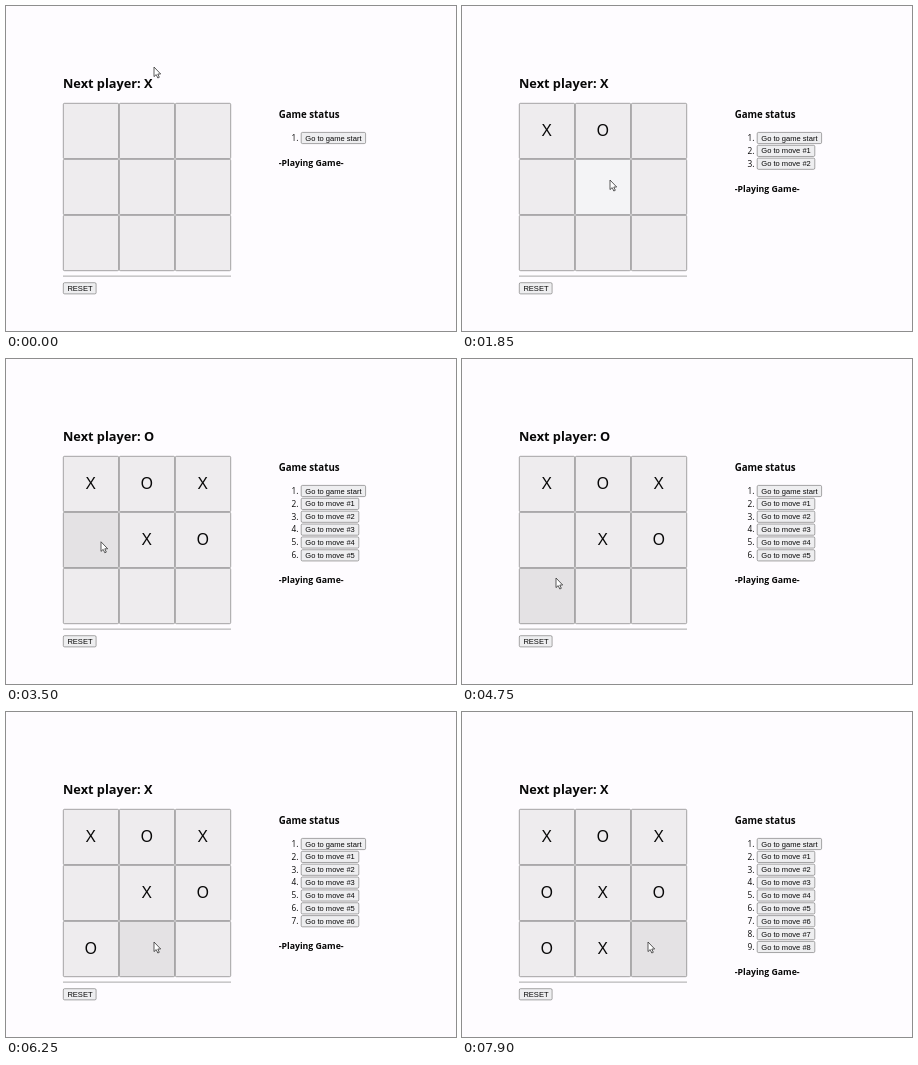
An HTML page for the animation above (8000 ms loop, 450 by 325 pixels).

```html
<!DOCTYPE html>
<html lang="en">
<head>
<meta charset="utf-8">
<title>Tic-tac-toe</title>
<style>
  html, body { margin: 0; width: 100%; height: 100%; overflow: hidden; background: #fefcff; }
  svg { display: block; width: 100vw; height: 100vh; }
  text { fill: #080808; }
  .ui { font-family: "Open Sans", "Noto Sans", sans-serif; }
  .bold { font-weight: 700; }
  .arial { font-family: "Liberation Sans", Arial, sans-serif; }
  .small { font-size: 7.55px; }
  .mark { font-size: 15.6px; text-anchor: middle; }
  .num { font-size: 8.3px; text-anchor: end; }
  rect { stroke: #6c6c6c; stroke-width: .6; }
  .button { fill: #eeeef0; }
  .rule { fill: #a8a8a8; stroke: none; }
</style>
</head>
<body>
<svg id="stage" viewBox="0 0 450 325" xmlns="http://www.w3.org/2000/svg"></svg>
<script>
const LOOP = 8000, TICK = 50, PRESS = 200;
const LEFT = 57, TOP = 97, CELL = 56, ROW = 12.87;
const IDLE = '#eeecee', HOVER = '#e4e2e4', PRESSED = '#f4f4f6';

// Pointer stops; a stop with a release time is a click on the cell below it
const stops = [
  { at: 0, x: 148, y: 61 },
  { at: 400, x: 164, y: 60 },
  { at: 900, x: 92, y: 122, release: 1100 },
  { at: 1450, x: 141, y: 122, release: 1600 },
  { at: 1750, x: 148, y: 174, release: 1950 },
  { at: 2100, x: 190, y: 174, release: 2150 },
  { at: 2350, x: 184, y: 120, release: 2900 },
  { at: 3350, x: 95, y: 182 },
  { at: 3600, x: 95, y: 196 },
  { at: 4300, x: 94, y: 219 },
  { at: 4900, x: 95, y: 203 },
  { at: 5100, x: 94, y: 224, release: 5800 },
  { at: 6000, x: 148, y: 230, release: 6500 },
  { at: 6800, x: 94, y: 195, release: 7600 },
  { at: 7900, x: 186, y: 230 }
];
const clicks = stops.filter(s => s.release);
for (const s of clicks) s.cell = cellAt(s.x, s.y);

const stage = document.getElementById('stage');

function add(tag, attrs, content, parent = stage) {
  const el = document.createElementNS('http://www.w3.org/2000/svg', tag);
  for (const key in attrs) el.setAttribute(key, attrs[key]);
  if (content) el.textContent = content;
  parent.appendChild(el);
  return el;
}

function label(x, y, cls, content, size, parent) {
  const attrs = { x, y, class: cls };
  if (size) attrs['font-size'] = size;
  return add('text', attrs, content, parent);
}

function button(x, y, width, content, parent) {
  add('rect', { x, y, width, height: 11.2, rx: 1.3, class: 'button' }, '', parent);
  label(x + 4.1, y + 8.2, 'arial small', content, 0, parent);
}

const title = label(57, 82.1, 'ui bold', '', 12.75);
label(272.7, 112, 'ui bold', 'Game status', 9.7);
const status = label(272.7, 0, 'ui bold', '-Playing Game-', 8.74);

const cells = Array.from({ length: 9 }, (_, i) => {
  const x = LEFT + CELL * (i % 3), y = TOP + CELL * Math.floor(i / 3);
  const box = add('rect', { x: x + .3, y: y + .3, width: CELL - .6, height: CELL - .6, rx: 1.2 });
  return { box, mark: label(x + 27.8, y + 33, 'arial mark', '') };
});

add('rect', { x: LEFT, y: 269.6, width: 3 * CELL, height: 1, class: 'rule' });
button(57.3, 276.7, 32.8, 'RESET');

const rows = Array.from({ length: 9 }, (_, i) => {
  const g = add('g', { transform: `translate(0 ${i * ROW})` });
  label(292.4, 134.8, 'ui num', `${i + 1}.`, 0, g);
  button(295.2, 126.4, i ? 57.6 : 64.4, i ? `Go to move #${i}` : 'Go to game start', g);
  return g;
});

const pointer = add('path', {
  d: 'M0 0V9.6L2.2 7.6 3.8 11 5.3 10.3 3.8 7H6.7Z',
  fill: '#fff', stroke: '#333', 'stroke-width': .8, 'stroke-linejoin': 'round'
});

// Longer glides take more time; each ends when its stop is due
function pointerAt(t) {
  const next = stops.findIndex(s => s.at > t);
  if (next < 0) return stops[stops.length - 1];
  const a = stops[next - 1], b = stops[next];
  const span = 100 + 1.2 * Math.hypot(b.x - a.x, b.y - a.y);
  const p = Math.max(0, 1 - (b.at - t) / span);
  const k = p * p * (3 - 2 * p);
  return { x: a.x + (b.x - a.x) * k, y: a.y + (b.y - a.y) * k };
}

function cellAt(x, y) {
  const col = Math.floor((x - LEFT) / CELL), row = Math.floor((y - TOP) / CELL);
  return col >= 0 && col < 3 && row >= 0 && row < 3 ? row * 3 + col : -1;
}

function draw(time) {
  const t = Math.floor((time % LOOP) / TICK) * TICK;
  const { x, y } = pointerAt(t);
  const over = cellAt(x, y);
  const turns = clicks.filter(c => t >= c.release).length;
  const held = clicks.some(c => c.cell === over && t < c.release && t >= c.release - PRESS);

  cells.forEach(({ box, mark }, i) => {
    const turn = clicks.findIndex(c => c.cell === i);
    mark.textContent = turn >= 0 && turn < turns ? 'XO'[turn % 2] : '';
    box.setAttribute('fill', i !== over ? IDLE : held ? PRESSED : HOVER);
  });
  rows.forEach((row, i) => row.setAttribute('visibility', i <= turns ? 'visible' : 'hidden'));
  title.textContent = 'Next player: ' + 'XO'[turns % 2];
  status.setAttribute('y', 160.1 + turns * ROW);
  pointer.setAttribute('transform', `translate(${x} ${y})`);
}

const began = performance.now();
function frame() {
  draw(performance.now() - began);
  requestAnimationFrame(frame);
}
frame();
</script>
</body>
</html>
```
